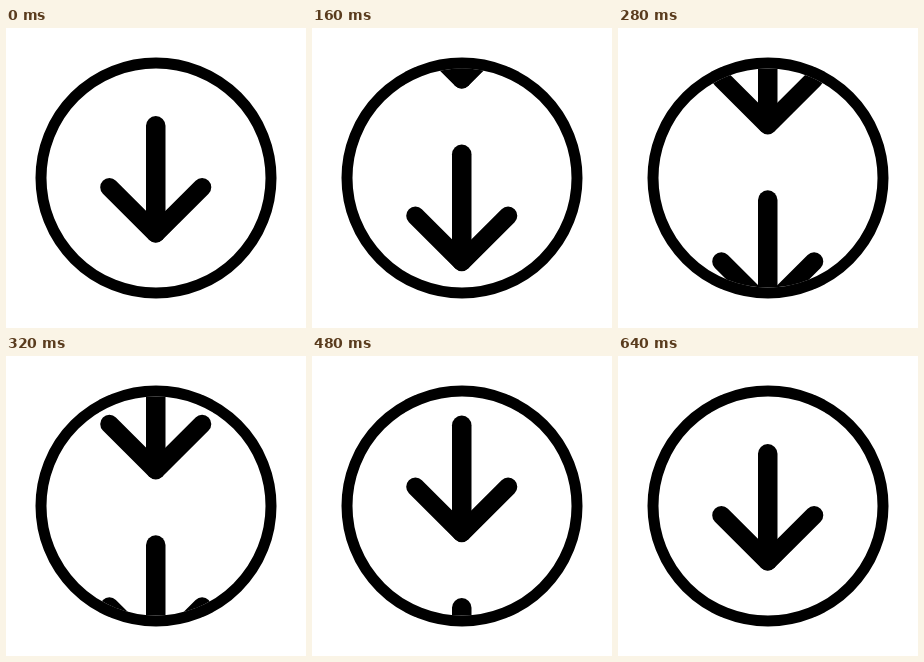
These frames come from a looping animation (300 by 300 pixels, 1960 ms). An HTML page:

```html
<!DOCTYPE html>
<html lang="en">
<head>
<meta charset="utf-8">
<title>Download arrow</title>
<style>
  html, body { margin: 0; width: 100%; height: 100%; overflow: hidden; background: #fff; }
  svg { display: block; width: 100vw; height: 100vh; }
</style>
</head>
<body>
<svg viewBox="0 0 300 300" fill="none" stroke="#000" stroke-linecap="round" stroke-linejoin="round">
  <defs>
    <clipPath id="hole"><circle cx="150" cy="150" r="109.5"/></clipPath>
    <g id="arrow">
      <path d="M149.75 97.8V204.5" stroke-width="19.5"/>
      <path d="M103.4 159.2L149.75 205.5L196.1 159.2" stroke-width="18.4"/>
    </g>
  </defs>
  <g clip-path="url(#hole)">
    <g id="track">
      <use href="#arrow"/>
      <use href="#arrow" y="-182.5"/>
    </g>
  </g>
  <circle cx="150" cy="150" r="115" stroke-width="11"/>
</svg>
<script>
  const LOOP = 1960, MOVE = 640, TICK = 40, TRAVEL = 182.5;
  const track = document.getElementById('track');
  const start = performance.now();
  const smooth = u => u * u * (3 - 2 * u);

  function draw(now) {
    const t = Math.max(0, now - start) % LOOP;
    // The motion advances in whole ticks, then rests.
    const u = Math.min(1, Math.floor(t / TICK) * TICK / MOVE);
    track.setAttribute('transform', `translate(0 ${TRAVEL * smooth(u)})`);
    requestAnimationFrame(draw);
  }
  draw(start);
</script>
</body>
</html>
```
